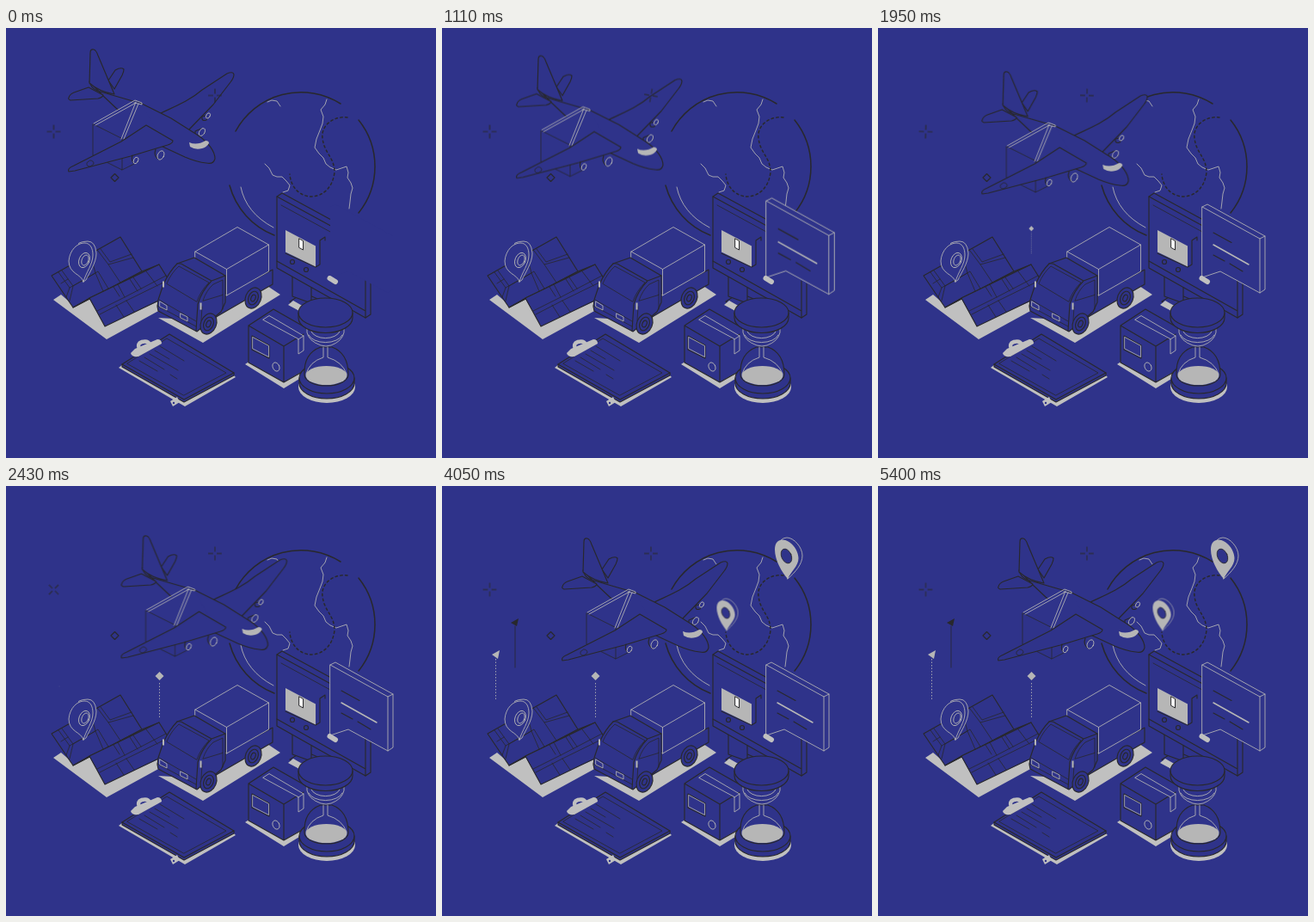
An HTML page for the animation above (5430 ms loop, 500x500 px).

```html
<!DOCTYPE html>
<html lang="en">
<head>
<meta charset="utf-8">
<title>Delivery</title>
<style>
  :root { --bg: #2f338a; --ink: #28282c; --pale: #b6b6b6; --shade: #c0c0c0; }
  html, body { margin: 0; width: 100%; height: 100%; overflow: hidden; background: var(--bg); }
  svg { display: block; width: 100vw; height: 100vh; }
  path, ellipse, circle { stroke-linejoin: round; stroke-linecap: round; }
  .d, .f { stroke: var(--ink); stroke-width: 1.15; }
  .l, .lf { stroke: var(--pale); stroke-width: .85; }
  .d, .l { fill: none; }
  .f, .lf, .b { fill: var(--bg); }
  .g { fill: var(--pale); }
  .s { fill: var(--shade); }
  .w { fill: #fff; stroke: var(--ink); }
  .thin { stroke-width: .8; }
  .bold { stroke-width: 1.5; }
  .dots { stroke-dasharray: 1.5 2; stroke-linecap: butt; }

  .anim { animation: 5430ms linear infinite; }
  .plane { animation-name: fly; }
  .bubble { animation-name: bubble; transform-origin: 377px 290px; }
  .spark { animation-name: twirl; transform-origin: 0 0; }
  .late { animation-delay: 1710ms; }
  .pin-a { animation-name: pinA; transform-origin: 0 0; }
  .pin-b { animation-name: pinB; transform-origin: 0 0; }
  .tick-a { animation-name: tickA; transform-origin: 178px 252px; }
  .tick-b { animation-name: tickB; transform-origin: 62px 236px; }
  .tick-c { animation-name: tickC; transform-origin: 85px 193px; }

  @keyframes fly {
    0%, 1.84% { transform: none; animation-timing-function: cubic-bezier(.5, 0, .5, 1); }
    57.1%, 100% { transform: translate(67px, 36px); }
  }
  @keyframes bubble {
    0%, 8.5% { transform: scale(0); animation-timing-function: ease-out; }
    17.7% { transform: scale(1.09); animation-timing-function: ease-in-out; }
    35%, 100% { transform: none; }
  }
  @keyframes twirl {
    0%, 2.8% { transform: rotate(0); animation-timing-function: ease-in; }
    13.3% { transform: rotate(45deg); animation-timing-function: ease-out; }
    20.3% { transform: rotate(100deg); animation-timing-function: ease-in-out; }
    27.6% { transform: rotate(75deg); animation-timing-function: ease-in-out; }
    33% { transform: rotate(93deg); animation-timing-function: ease-in-out; }
    38.7%, 100% { transform: rotate(90deg); }
  }
  @keyframes pinA {
    0%, 48.8% { transform: scale(0); animation-timing-function: ease-out; }
    55.2% { transform: scale(1.25); animation-timing-function: ease-in-out; }
    60.8% { transform: scale(.95); animation-timing-function: ease-in-out; }
    66.3% { transform: scale(1.05); animation-timing-function: ease-in-out; }
    72%, 100% { transform: none; }
  }
  @keyframes pinB {
    0%, 46% { transform: scale(0); animation-timing-function: ease-out; }
    51.6% { transform: scale(1.28); animation-timing-function: ease-in-out; }
    57.8% { transform: scale(.93); animation-timing-function: ease-in-out; }
    62.6% { transform: scale(1.07); animation-timing-function: ease-in-out; }
    70%, 100% { transform: none; }
  }
  @keyframes tickA {
    0%, 30.4% { transform: scale(0); animation-timing-function: ease-out; }
    43.3%, 100% { transform: none; }
  }
  @keyframes tickB {
    0%, 44.2% { transform: scale(0); animation-timing-function: ease-out; }
    57.1%, 100% { transform: none; }
  }
  @keyframes tickC {
    0%, 49.7% { transform: scale(0); animation-timing-function: ease-out; }
    62.6%, 100% { transform: none; }
  }
</style>
</head>
<body>
<svg viewBox="0 0 500 500">
  <defs>
    <path id="star" class="d" d="M-7.500 0h5M2.500 0h5M0-7.500v5M0 2.500v5"/>
    <g id="pin">
      <path class="lf" d="M0 0C9-8 17-17 17-27C17-37 7-48-1-48Q-5-48-8-45L0-30Z"/>
      <path class="g" d="M0 0C-7-8-15-22-15-34C-15-42-11-45.500-6-45.500C3-45.500 12.500-34 12.500-24C12.500-15 4-9 0 0Z"/>
      <ellipse class="f thin" cx="-1.500" cy="-26.500" rx="5.700" ry="8.800" transform="rotate(-24 -1.500 -26.500)"/>
    </g>
    <g id="wheel">
      <ellipse class="f" rx="9" ry="12.500" transform="rotate(22)"/>
      <ellipse class="d" rx="5.500" ry="8" transform="rotate(22)"/>
      <ellipse class="d" rx="2.500" ry="4" transform="rotate(22)"/>
    </g>
    <path id="patch" d="M377 208L383 205L450 242V304L444 308L398 283L377 290Z"/>
  </defs>

  <g id="globe">
    <path class="d bold" d="M267 120A86.300 86.300 0 0 1 389 88M410 107A86.300 86.300 0 0 1 410 215M260 183A86.300 86.300 0 0 0 312 241"/>
    <path class="l" d="M273 185Q279 215 311 232M304 86L309 84L315 85L319 91"/>
    <path class="l" d="M373 83L371 89L366 95L369 103L368 111L365 119L361 129L359 139L364 146L369 151L372 158L377 162L384 165L390 163L396 161L398 168L397 174L401 180L403 186L401 193L400 202L399 210"/>
    <path class="l" d="M301 158L306 163L310 171L315 173L321 173L326 178L330 183L328 189L322 191"/>
    <path class="d bold" stroke-dasharray="2.500 3.300" d="M397 104C380 102 366 114 368 128C370 146 382 150 382 168C380 184 370 196 354 196C340 195 331 184 330 170"/>
  </g>

  <g class="anim plane">
    <path class="f" d="M180 99C199 90 214 84 228 72L257 53Q264 50 265 54Q265 58 261 63L241 89L211 120Z"/>
    <path class="f" d="M220 120Q219 127 225 126L231 122L227 117ZM228 103Q227 109 233 107L236 101Z"/>
    <g class="lf">
      <ellipse cx="228" cy="121" rx="3" ry="4.800" transform="rotate(30 228 121)"/>
      <ellipse cx="235" cy="102" rx="2.200" ry="3.400" transform="rotate(30 235 102)"/>
    </g>
    <path class="f" d="M119 61L127 49Q134 45 137 48Q137 51 135 55L126 71Z"/>
    <path class="f" d="M97 62Q98 69 106 73L158 88L192 105L222 124C236 133 243 144 243 152Q241 159 233 157Q222 156 208 150L165 130L130 95L113 79Z"/>
    <path class="b" d="M101 112L150 85L158 89L180 128L135 164L101 148Z"/>
    <path class="d thin" d="M101 112V148L135 165V129ZM135 165L153 156"/>
    <path class="f" d="M97 64L98 29Q98 24 102 25Q105 26 107 32L126 77Q108 74 97 64Z"/>
    <path class="f" d="M73 81Q74 77 79 75L96 69L113 78Q112 81 107 82L75 84Q72 83 73 81Z"/>
    <path class="l" d="M102 111L150 84L158 87V89L149 87M104 113L151 87M151 86L134 129M154 88L137 129"/>
    <path class="f" d="M73 167Q71 163 79 160L134 132L163 113L194 131Q194 134 188 136L145 149L80 166Z"/>
    <path class="d thin" d="M94 157Q93 161 98 161L102 158Q102 154 98 154Z"/>
    <path class="d" d="M174 141Q171 149 178 153M147 148Q145 155 149 157"/>
    <g class="lf">
      <ellipse cx="180" cy="148" rx="3.600" ry="5.400" transform="rotate(25 180 148)"/>
      <ellipse cx="151" cy="154" rx="2.500" ry="4" transform="rotate(25 151 154)"/>
    </g>
    <path class="g" d="M213 133Q222 137 232 131Q236 131 236 134Q233 139 228 140Q220 142 214 138Z"/>
  </g>

  <g transform="translate(55.500 120.500)"><use href="#star" class="anim spark late"/></g>
  <g transform="translate(243 78.500)"><use href="#star" class="anim spark"/></g>
  <path class="d" d="M126.500 169.500L131 174L126.500 178.500L122 174Z"/>

  <g class="anim tick-a">
    <path class="g" d="M178.500 216L183.500 221L178.500 226L173.500 221Z"/>
    <path class="l dots" d="M178.500 229V269"/>
  </g>
  <g class="anim tick-b">
    <path class="g" d="M67 191L58 196L65 201Z"/>
    <path class="l dots" d="M62.500 201V249"/>
  </g>
  <g class="anim tick-c">
    <path fill="var(--ink)" d="M89 154L80 159L87 163Z"/>
    <path class="d thin" d="M85 163V211"/>
  </g>

  <g transform="translate(331 168) scale(.77)"><use href="#pin" class="anim pin-a"/></g>
  <g transform="translate(402 108)"><use href="#pin" class="anim pin-b"/></g>

  <g id="map">
    <path class="s" d="M55 316L64 310L78 322L97 315L115 346L190 312V322L117 362Z"/>
    <path class="f" d="M53 288L133 243L158 283L78 325Z"/>
    <path class="f" d="M78 325L158 283L178 275L97 314Z"/>
    <path class="f" d="M97 314L178 275L198 307L115 347Z"/>
    <g class="d thin">
      <path d="M61 284L74 302L70 313M65 282L78 300L74 317M74 302L104 285L98 262M78 300L107 283L119 303M104 285L113 306M107 259L119 275L148 267M110 257L121 272L146 263M119 275L133 296M64 297L72 292"/>
      <path d="M106 329L138 313L186 288M109 333L140 317L189 293M138 313L130 298M140 317L149 330M144 292L153 306M148 290L157 303M163 283L176 300M125 301L132 312M128 322L137 336"/>
    </g>
  </g>
  <g id="map-pin">
    <path class="lf" d="M90 295L93 293C97 284 105 273 105 262Q104 248 95 248Q89 248 85 250Z"/>
    <path class="lf" d="M90 295C88 286 73 286 73 271C74 258 83 250 91 250C98 250 101 256 101 264C101 275 93 284 90 295Z"/>
    <ellipse class="l" cx="91" cy="270" rx="6" ry="9" transform="rotate(22 91 270)"/>
    <ellipse class="l" cx="92" cy="270" rx="3.800" ry="6.300" transform="rotate(22 92 270)"/>
  </g>

  <g id="truck">
    <path class="s" d="M177 337L229 366L319 310L304 300L230 340Z"/>
    <path class="f" d="M240 318L310 281V298L246 335L226 350Z"/>
    <path class="lf" d="M220 260L269 231.500L305.500 252V283L256.500 311L220 290Z"/>
    <path class="l" d="M220 260L256.500 280.500L305.500 252M256.500 280.500V311"/>
    <path class="f" d="M176 324L177 316L183 298Q190 283 199 274L219 267L255 288V319L250 330L222 353L177 329Z"/>
    <path class="d" d="M199 274Q203 273 207 276L239 294L255 288M239 294Q228 305 223 321L221 352"/>
    <path class="d thin" d="M187 297Q192 285 201 277L236 296Q226 306 222 318ZM178 316L221 341M176 323L221 347M229 317Q233 305 241 298L252 293V310ZM228 324L227 340M252 310V327"/>
    <path class="l" d="M179 318L187 323V328L179 324ZM203 332L211 336V341L203 337Z"/>
    <path class="g" d="M182 294.500h2v7h-2ZM225.500 319.500h2v8h-2Z"/>
    <use href="#wheel" x="235.500" y="344"/>
    <use href="#wheel" x="287.500" y="314"/>
  </g>

  <g id="monitor">
    <path class="f" d="M330 318L346 308L374 320L350 336Z"/>
    <path class="s" d="M328 322L334 317L348 325L341 329Z"/>
    <path class="f" d="M333 286V312L355 320V298Z"/>
    <path class="f" d="M315 196L321 192L424 248V333L418 337L315 279Z"/>
    <path class="d" d="M315 196L418 252V337M315 271L418 329"/>
    <path class="d thin" d="M320 206L412 256"/>
    <path class="d" d="M371 243L365 247V275L360 278L325 262M371 243V247"/>
    <circle class="d" cx="333" cy="272" r="2.500"/>
    <circle class="d" cx="349" cy="281" r="2.500"/>
    <path class="g" d="M325 235L360 253.500V277.500L325 260.500Z"/>
    <path class="w" d="M341 245L345.500 247.500V258L341 255.500Z"/>
  </g>
  <use href="#patch" class="b"/>
  <g class="anim bubble">
    <use href="#patch" class="lf"/>
    <path class="l" d="M377 208L444 245L450 242M444 245V308"/>
    <path class="l bold" d="M390 252L431 275"/>
    <path class="d" d="M390 238L411 249.500M390 264L403 271M409 274L424 283"/>
  </g>
  <path d="M376.500 291L383 295" stroke="var(--shade)" stroke-width="6"/>

  <g id="clipboard">
    <path class="s" d="M131 395L136 391L207 433L263 402L267 406L208 440Z"/>
    <path class="f" d="M135 391L190 356L265 401V404L207 435L135 394Z"/>
    <path class="d" d="M135 391L207 432L265 401"/>
    <path class="d thin" d="M141 390L187 361L256 401L207 427Z"/>
    <path class="d thin" d="M179 370L207 387M173 375L190 385M167 379L200 398M161 383L184 397M155 387L176 399M191 403L199 408"/>
    <path class="s" d="M145 378L150 373L176 362Q181 362 181 367L154 382Q146 383 145 378Z"/>
    <path d="M155 373Q152 367 158 365Q165 363 167 368" fill="none" stroke="var(--shade)" stroke-width="4.500"/>
    <path class="s" d="M191 434L199 429L202 435L194 440Z"/>
    <circle class="b" cx="195" cy="436" r="1.200"/>
  </g>

  <g id="parcel">
    <path class="s" d="M278 391L284 387L323 408L346 396V405L323 419Z"/>
    <path class="b" d="M282 346L311 327L352 350V395L323 412L282 389Z"/>
    <path class="d" d="M346 347L311 327L282 346V389L323 412L346 399M282 346L323 370L346 356M323 370V412"/>
    <path class="lf" d="M299 339L306 334.500L346 358V375L340 379V362Z"/>
    <path class="l" d="M340 362L346 358"/>
    <path class="d" d="M286 358L306 369V384L286 374Z"/>
    <path class="l thin" d="M287 359.500L305.500 369.500V382.500L287 373Z"/>
    <ellipse class="l" cx="314" cy="394" rx="3.800" ry="5.300" transform="rotate(-25 314 394)"/>
  </g>

  <g id="hourglass">
    <ellipse class="s" cx="373" cy="417.500" rx="33" ry="18.500"/>
    <path class="f" d="M341 407V413A32 18 0 0 0 405 413V407Z"/>
    <ellipse class="f" cx="373" cy="407" rx="32" ry="18"/>
    <path class="f" d="M347 403Q346 378 366 371H379Q398 378 398 403A25.500 13 0 0 1 347 403Z"/>
    <path class="l" d="M369 371V383Q353 388 349 402M374 371V383Q391 388 396 402"/>
    <ellipse class="g" cx="372.500" cy="404" rx="24" ry="11"/>
    <path class="lf" d="M350 345V354Q352 364 366 369Q372 371 378 369Q391 364 393 354V345Z"/>
    <path class="l" d="M355 353A17 10 0 0 0 388 353M352 357A20 11 0 0 0 391 357"/>
    <path class="f" d="M340 331V337A31.500 17.500 0 0 0 403 337V331Z"/>
    <ellipse class="f" cx="371.500" cy="331" rx="31.500" ry="17"/>
  </g>
</svg>
</body>
</html>
```
